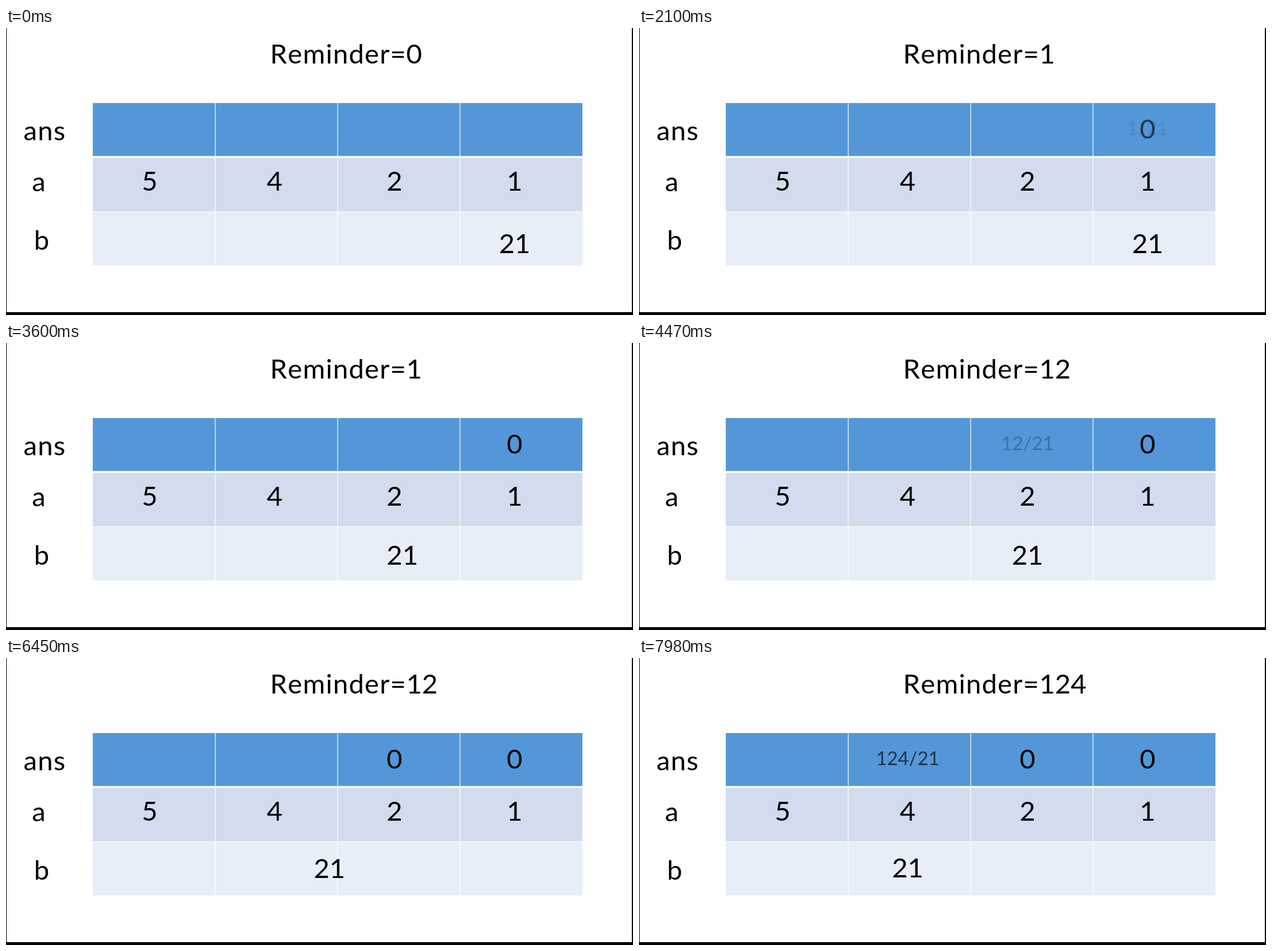
Write an HTML page that moves like this. It is 1091 by 501 pixels and loops after 8000 ms.

```html
<!DOCTYPE html>
<html lang="en">
<head>
<meta charset="utf-8">
<title>Long division table</title>
<style>
  html, body { margin: 0; width: 100%; height: 100%; overflow: hidden; background: #fff; }
  svg { display: block; width: 1091px; height: 501px; }
  text { font: 47.2px Lato, "Open Sans", sans-serif; font-kerning: none; fill: #000; }
  .word { letter-spacing: 1.2px; }
  .mid { text-anchor: middle; }
  .small { font-size: 32.8px; }
</style>
</head>
<body>
<svg id="stage" viewBox="0 0 1091 501"></svg>
<script>
const LOOP = 8000;
const stage = document.getElementById("stage");

function add(tag, attrs, content, parent = stage) {
  const el = document.createElementNS("http://www.w3.org/2000/svg", tag);
  for (const key in attrs) el.setAttribute(key, attrs[key]);
  if (content !== undefined) el.textContent = content;
  parent.appendChild(el);
  return el;
}
const rect = (x, y, width, height, fill) => add("rect", { x, y, width, height, fill });
const label = (x, y, str, cls = "mid") => add("text", { x, y, class: cls }, str);

// Page edges
rect(0, 0, 1091, 501, "#fff");
rect(0, 0, 1, 501, "#000");
rect(1089, 0, 2, 501, "#000");
rect(0, 496, 1091, 5, "#000");

// Table
rect(151, 131, 852, 92.5, "#5497d8");
rect(151, 227, 852, 93, "#d2dcee");
rect(151, 321, 852, 93.5, "#e8eef7");
for (const x of [363.5, 576.5, 789.5]) rect(x, 131, 1.2, 284, "#fff");

label(30.5, 196, "ans", "word");
label(57, 285, "a");
label(62, 386.5, "b");

const columns = [250, 467.5, 676, 885];
["5", "4", "2", "1"].forEach((d, i) => label(columns[i], 284, d));

// Heading variants cross-fade as digits are brought down
const headings = ["0", "1", "12", "124"].map(num => {
  const g = add("g", {});
  add("text", { x: 459.5, y: 62, class: "word" }, "Reminder=", g);
  add("text", { x: 696.5, y: 62 }, num, g);
  return g;
});
const headingTimes = [680, 3925, 7225];
const HEADING_FADE = 370;

// Each quotient fades in, then gives way to its result
const steps = [
  { start: 1100, col: 3, expr: "1/21" },
  { start: 4345, col: 2, expr: "12/21" },
  { start: 7655, col: 1, expr: "124/21" }
];
for (const s of steps) {
  s.exprEl = label(columns[s.col], 186.5, s.expr, "mid small");
  s.zeroEl = label(columns[s.col], 192.5, "0");
}

// Divisor stops and the times it leaves them
const divisor = label(0, 0, "21");
const stops = [[885, 392.5], [676, 386.5], [467.5, 382.5]];
const moveTimes = [2635, 5935];
const MOVE = 1200;

const ramp = (t, start, length) => Math.min(1, Math.max(0, (t - start) / length));
const glide = u => 0.64 * Math.sin(u * Math.PI / 2) + 0.36 * u * u * (3 - 2 * u);

function draw(t) {
  headings.forEach((g, i) => {
    const shown = i ? ramp(t, headingTimes[i - 1], HEADING_FADE) : 1;
    const gone = i < 3 ? ramp(t, headingTimes[i], HEADING_FADE) : 0;
    g.setAttribute("opacity", shown * (1 - gone));
  });

  for (const s of steps) {
    const shown = ramp(t, s.start, 500) * (1 - ramp(t, s.start + 540, 500));
    s.exprEl.setAttribute("opacity", shown);
    s.zeroEl.setAttribute("opacity", ramp(t, s.start + 700, 500));
  }

  let [x, y] = stops[0];
  moveTimes.forEach((start, i) => {
    const k = glide(ramp(t, start, MOVE));
    x += (stops[i + 1][0] - stops[i][0]) * k;
    y += (stops[i + 1][1] - stops[i][1]) * k;
  });
  divisor.setAttribute("x", x);
  divisor.setAttribute("y", y);
}

const origin = performance.now();
function tick() {
  draw((performance.now() - origin) % LOOP);
  requestAnimationFrame(tick);
}
draw(0);
requestAnimationFrame(tick);
</script>
</body>
</html>
```
